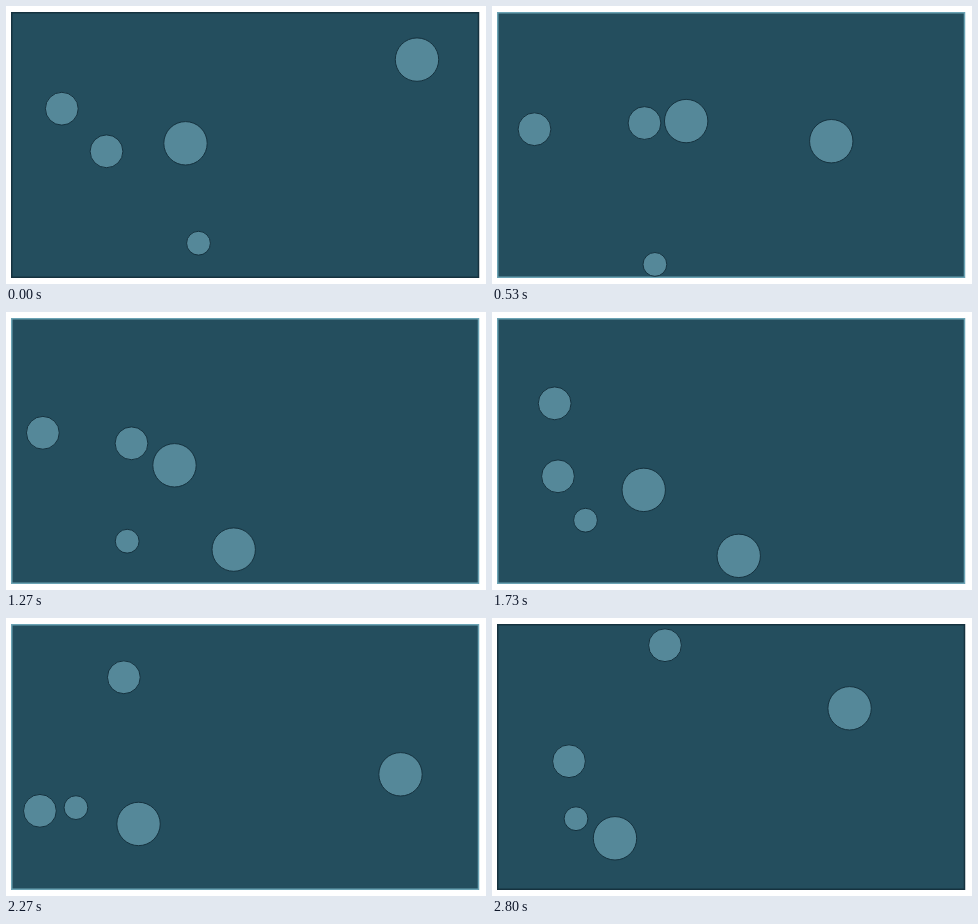
Recreate the animation shown at these times as an HTML page with a canvas. Size 480 by 278 pixels, loop 2.87 s.

```html
<!DOCTYPE html>
<html lang="en">
<head>
<meta charset="utf-8">
<title>Bouncing balls</title>
<style>
  html, body { margin: 0; width: 100%; height: 100%; overflow: hidden; background: #fff; }
  canvas { display: block; width: 480px; height: 278px; }
</style>
</head>
<body>
<canvas id="stage"></canvas>
<script>
const LOOP = 2870;
const FLASH_STEPS = 2.5;
const WALLS = { left: 6, right: 472, top: 7, bottom: 271 };
const COLORS = { box: '#244e5e', ball: '#558899', outline: '#15323f', flash: '#6ba3b4' };

// Turns are [step, x, y]. A point beyond a wall is mirrored back inside,
// so wall bounces follow from the straight run between two turns.
const balls = [
  { r: 21.7, turns: [[0, 411, 445], [15, 276.5, 292], [22.5, 185, 190],
    [25.5, 237.5, 249.3], [34, 394.5, 156.3], [42, 543, 90.3]] },
  { r: 21.7, turns: [[0, 179.5, 137.3], [9, 196, 112.3], [19, 168.5, 153.3],
    [40.2, 117.7, 227.7], [42, 123, 220.3]] },
  { r: 16.4, turns: [[0, -11, 102.7], [8, 42.5, 123.2], [16.3, 73.3, 135.1],
    [20.1, 22, 115], [42, 173, 27.2]] },
  { r: 16.4, turns: [[0, 100.5, 145.3], [9, 159, 113.5], [16.5, 114, 138.2],
    [18, 134, 126.6], [26, 66, 164.3], [35, 4, 196.4], [42, 77, 143.2]] },
  { r: 11.9, turns: [[0, 192.5, 281], [15, 137, 241.2], [26, 93.5, 208.2],
    [35, 67, 187.3], [40.2, 91, 206.2], [42, 84, 200.7]] }
];

const canvas = document.getElementById('stage');
const ratio = window.devicePixelRatio || 1;
canvas.width = 480 * ratio;
canvas.height = 278 * ratio;
const ctx = canvas.getContext('2d');
ctx.scale(ratio, ratio);

function mirror(v, low, high) {
  if (v < low) return 2 * low - v;
  return v > high ? 2 * high - v : v;
}

function positionAt({ r, turns }, step) {
  const i = Math.max(1, turns.findIndex(turn => turn[0] >= step));
  const [n0, x0, y0] = turns[i - 1];
  const [n1, x1, y1] = turns[i];
  const k = (step - n0) / (n1 - n0);
  return [
    mirror(x0 + (x1 - x0) * k, WALLS.left + r, WALLS.right - r),
    mirror(y0 + (y1 - y0) * k, WALLS.top + r, WALLS.bottom - r)
  ];
}

function touchesWall(ball, step) {
  const [x, y] = positionAt(ball, step);
  const gap = Math.min(x - WALLS.left, WALLS.right - x, y - WALLS.top, WALLS.bottom - y);
  return gap - ball.r < 1.5;
}

// The frame stays lit for a short while after any wall bounce.
function isLit(step) {
  for (let s = Math.max(0, step - FLASH_STEPS); s <= step; s += 0.125) {
    if (balls.some(ball => touchesWall(ball, s))) return true;
  }
  return false;
}

// 15 steps per second, with starts rounded to 10 ms.
function stepAt(ms) {
  return Math.floor((Math.floor(ms / 10) + 0.5) * 0.15);
}

function draw(step) {
  ctx.fillStyle = '#fff';
  ctx.fillRect(0, 0, 480, 278);

  ctx.fillStyle = COLORS.box;
  ctx.strokeStyle = isLit(step) ? COLORS.flash : COLORS.outline;
  ctx.lineWidth = 1.5;
  ctx.beginPath();
  ctx.rect(5.75, 6.75, 466.75, 264.5);
  ctx.fill();
  ctx.stroke();

  ctx.fillStyle = COLORS.ball;
  ctx.strokeStyle = COLORS.outline;
  ctx.lineWidth = 1;
  for (const ball of balls) {
    const [x, y] = positionAt(ball, step);
    ctx.beginPath();
    ctx.arc(x, y, ball.r, 0, Math.PI * 2);
    ctx.fill();
    ctx.stroke();
  }
}

const start = performance.now();
function tick() {
  draw(stepAt((performance.now() - start) % LOOP));
  requestAnimationFrame(tick);
}
tick();
</script>
</body>
</html>
```
